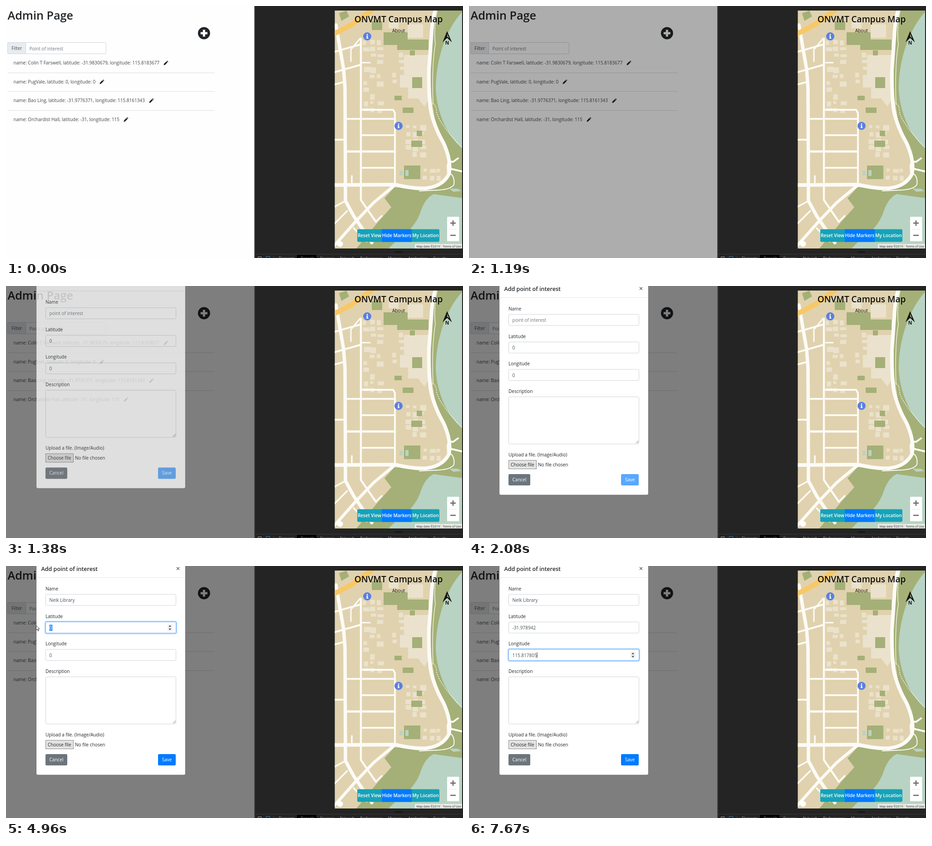
These frames come from a looping animation (1007x556 px, 8000 ms). An HTML page:

```html
<!DOCTYPE html>
<html lang="en">
<head>
<meta charset="utf-8">
<title>Admin page and campus map</title>
<style>
  html, body { margin: 0; width: 100%; height: 100%; overflow: hidden; background: #242424; }
  svg { display: block; width: 1007px; height: 556px; }
  text { font-family: "Open Sans", "Noto Sans", sans-serif; font-size: 10px; white-space: pre; }
  .semi { font-weight: 600; }
  .mid { text-anchor: middle; }
  .small { font-family: Roboto, Arial, sans-serif; font-size: 6.9px; }
  .tab { font-family: Roboto, Arial, sans-serif; font-size: 8.5px; }
  .road { fill: none; stroke: #fdfbf6; stroke-linejoin: round; stroke-linecap: round; }
</style>
</head>
<body>
<svg id="stage" viewBox="0 0 1007 556" xmlns="http://www.w3.org/2000/svg"></svg>
<script>
const LOOP = 8000;
const $ = id => document.getElementById(id);

// ---- drawing helpers ----
const rect = (x, y, w, h, fill, more = '') =>
  `<rect x="${x}" y="${y}" width="${w}" height="${h}" fill="${fill}" ${more}/>`;
const text = (x, y, s, fill = '#212529', more = '') =>
  `<text x="${x}" y="${y}" fill="${fill}" ${more}>${s}</text>`;
const path = (d, fill, more = '') => `<path d="${d}" fill="${fill}" ${more}/>`;
const line = (d, stroke, width = 1) => path(d, 'none', `stroke="${stroke}" stroke-width="${width}"`);
const road = (d, w) => `<path class="road" d="${d}" stroke-width="${w}"/>`;

// ---- left page ----
function pencil(x, y) {
  return `<g transform="translate(${x} ${y})">` +
    path('M-4.6 4.6L-4 1.6 1.4-3.8 3.8-1.4-1.6 4zM2-4.4L3-5.2Q3.6-5.4 5.1-3.9 5.5-3.2 5.1-2.8L4.4-2z', '#212529') + '</g>';
}

function page() {
  const rows = [
    ['Colin T Farswell', '-31.9830679', '115.8183677', 352],
    ['PugVale', '0', '0', 211],
    ['Bao Ling', '-31.9776371', '115.8161343', 320],
    ['Orchardist Hall', '-31', '115', 264]
  ];
  let s = rect(0, 0, 547, 556, '#fefefe') +
    text(3.5, 29.5, 'Admin Page', '#212529', 'class="semi" style="font-size:25.2px"') +
    '<circle cx="436.3" cy="60" r="13.4" fill="#212529"/>' +
    line('M428.8 60h15M436.300 52.500v15', '#fefefe', 5) +
    rect(3.5, 80.5, 217, 25, '#fff', 'rx="2.5" stroke="#ced4da"') +
    rect(3.5, 80.5, 40, 25, '#e9ecef', 'rx="2.5" stroke="#ced4da"') +
    text(12, 97, 'Filter', '#495057') +
    text(51.5, 97.5, 'Point of interest', '#6c757d');
  rows.forEach(([name, lat, lon, x], i) => {
    const y = 129 + i * 41.6;
    s += text(16.5, y, `name: ${name}, latitude: ${lat}, longitude: ${lon}`, '#40454a') + pencil(x, y - 3);
    if (i < 3) s += rect(4, Math.round(y + 17.5), 455, 1, '#dcdcdc');
  });
  return s;
}

// ---- map ----
const GREEN = '#a4b077', WATER = '#b8d3c3', BUILT = '#ebe2cd';

function seeded(seed) {
  return () => (seed = (seed * 16807) % 2147483647) / 2147483647;
}

// loosely gridded houses filling an area
function houses(x, y, w, h, seed) {
  const rnd = seeded(seed), cell = 15;
  let d = '';
  for (let r = 0; r + cell <= h; r += cell) {
    for (let c = 0; c + cell <= w; c += cell) {
      const bw = 7 + rnd() * 8, bh = 6 + rnd() * 7;
      if (rnd() < .75) d += `M${(x + c + rnd() * 3).toFixed(1)} ${(y + r + rnd() * 3).toFixed(1)}h${bw.toFixed(1)}v${bh.toFixed(1)}h${(-bw).toFixed(1)}z`;
    }
  }
  return path(d, BUILT);
}

function marker(x, y) {
  return `<g transform="translate(${x} ${y})"><circle r="9" fill="#5a7fe2"/>` +
    '<circle cy="-3.9" r="1.5" fill="#fff"/>' +
    path('M-2-1.500h3.300v4.700h1v1.500h-4.500v-1.500h1v-3.200h-.8z', '#fff') + '</g>';
}

function land() {
  return rect(724, 10, 282, 526, '#e0d2ae') +
    path('M940 10H1006V535H772L822 474 849 444 834 424 856 400 940 402 974 376 980 345 945 250 934 180z', GREEN) +
    path('M1006 12C970 50 946 120 947 185C950 240 975 290 1006 314z', WATER) +
    path('M1006 424L942 415Q922 425 912 458Q900 490 868 510L842 536H1006z', WATER) +
    path('M977 403l18 0 9 5-18 2z', WATER) +
    houses(786, 74, 46, 174, 11) + houses(850, 102, 32, 80, 5) +
    houses(880, 262, 50, 82, 23) + houses(918, 358, 46, 32, 8) +
    path('M877 108h53v100l-8 14-14-18h-22v-24h-18v-28h9z', BUILT) +
    path('M885 40h34v30h-34zM843 30h22v19h-22z', BUILT) +
    path('M734 16l16-6 6 13-17 10zM806 33h23v20h-23z', GREEN) +
    path('M832 58h53v16h46v23h-69v-11h-30zM895 157h22v24h-22zM890 98h11v11h-11z', GREEN) +
    path('M856 198h16v10h-16zM874 224h24v12h-24zM905 275h12v12h-12zM893 297h24v14h-24zM877 352h36v30h-36z', GREEN) +
    path('M867 364h7v10h-7zM880 362h7v13h-7z', WATER);
}

function streets() {
  let s = '';
  for (let i = 0; i < 4; i++) s += road(`M${i % 2 ? 782 : 747} ${249 + i * 36}H857`, i === 2 ? 5 : 4);
  return s + road('M724 101L780 85M724 146L780 130M724 173L747 167M724 295H746M782 229H853L857 236V392', 4) +
    road('M782 72V428L815 476', 4.5) +
    road('M782 125H802M760 122V96L780 72', 3) +
    road('M762 395V375M748 430L724 443M724 480L752 452M766 490L795 520M815 476L828 463', 3.5) +
    road('M727 42L744 140 747 180 748 430 766 463 806 522', 7.5) +
    road('M724 395L857 394Q900 404 926 402Q962 398 976 371Q982 342 964 302Q941 262 935 225Q931 185 932 140L937 70Q938 40 945 10', 8) +
    road('M858 394L810 434 770 476 724 528', 6.5) +
    road('M975 368Q968 340 985 344L996 336M975 358L1005 365', 4) +
    road('M972 366Q990 372 987 394Q981 404 955 406L911 408', 2) +
    road('M950 10Q942 45 946 85Q938 130 941 216', 1.3) +
    '<path class="road" d="M941 216Q948 217 949 236Q957 262 1004 312" stroke-width="1.3" stroke-dasharray="3 2" style="stroke-linecap:butt"/>' +
    line('M718 64L762 41 812 5', '#f8c866', 11);
}

function controls() {
  let s = marker(796, 67) + marker(865, 264.5) +
    text(865, 36, 'ONVMT Campus Map', '#0b0b0b', 'class="semi mid" style="font-size:19px"') +
    text(865, 57.5, 'About', '#111', 'class="mid"') +
    path('M972 55.500L982.500 80 972 70.500 962 80z', '#111') +
    path('M972 61L976.500 71.500 972 67.500z', GREEN) +
    text(972, 84.5, 'N', '#111', 'class="mid" style="font-weight:700;font-size:10.5px"') +
    rect(774, 492.5, 181, 28, '#17a2b8', 'rx="3"') + rect(828, 492.5, 66, 28, '#007bff');
  [[801, 'Reset View'], [861, 'Hide Markers'], [924.5, 'My Location']].forEach(([x, label]) => {
    s += text(x, 510, label, '#fff', 'class="semi mid"');
  });
  return s + rect(972, 465, 26.5, 54, '#fff', 'rx="1.5"') + rect(976, 492, 18, 1, '#e6e6e6') +
    line('M979 479h12M985 473v12M979 506h12', '#666', 2.4) +
    '<circle cx="736" cy="525" r="6.5" fill="#fff"/>' +
    rect(901, 525, 104, 10, '#f3f2ee', 'opacity=".85"') +
    text(904.5, 532.7, 'Map data ©2019', '#444', 'class="small"') +
    rect(957.5, 526, 1, 8, '#c9c6bd') +
    text(962, 532.7, 'Terms of Use', '#444', 'class="small"');
}

function tools() {
  const tabs = ['Elements', 'Console', 'Sources', 'Network', 'Performance', 'Memory', 'Application', 'Security'];
  return rect(547, 0, 460, 556, '#242424') + rect(547, 0, 1.5, 556, '#555', 'id="edge"') +
    '<clipPath id="screen"><rect x="724.5" y="10" width="280.5" height="525"/></clipPath>' +
    '<g clip-path="url(#screen)">' + land() + streets() + controls() + '</g>' +
    line('M857 541.500h16M857 544h16', '#0c0c0c') +
    rect(549, 547, 458, 1, '#3b3b3b') + rect(641, 549, 43, 7, '#000') +
    line('M555.500 557v-3.500h7v3.500', '#a8a8a8') + line('M573.500 557v-4.500h8v4.500', '#2f7fb8') +
    rect(590, 552, 1, 4, '#444') +
    text(601, 560, tabs.join('      '), '#a8a8a8', 'class="tab"');
}

// ---- dialog ----
// visit: pointer comes, presses, drags to a point; then hides, text is pasted, focus leaves
const FIELDS = [
  { id: 'name', label: 'Name', y: 62, visit: [2580, 3200], drag: [66, 70], hide: 3200,
    paste: 3200, blur: 3760, before: 'point of interest', after: 'Nelk Library' },
  { id: 'lat', label: 'Latitude', y: 123, visit: [4330, 5100], drag: [39, 128], hide: 5100,
    paste: 5170, blur: 5720, before: '0', after: '-31.978942', number: true },
  { id: 'lon', label: 'Longitude', y: 183.5, visit: [6660, 7380], drag: [82, 178], hide: 7490,
    paste: 7630, blur: LOOP, before: '0', after: '115.817805', number: true }
];
const PRESS = .52;
FIELDS.forEach(f => { f.focus = f.visit[0] + PRESS * (f.visit[1] - f.visit[0]); });

function field({ id, label, y, number }) {
  const spin = number ? `<g id="${id}Spin">` + rect(356, y + 6, 11, 14, '#f0f0f0') +
    path(`M358.500 ${y + 11}l2.700-3.500 2.700 3.500zM358.500 ${y + 15}l2.700 3.500 2.700-3.500z`, '#444') + '</g>' : '';
  return text(87, y - 8.5, label) +
    rect(86, y - 1, 290, 27.5, 'none', `id="${id}Glow" rx="3.5" stroke="#007bff" stroke-opacity=".35" stroke-width="2"`) +
    rect(87.5, y + .5, 287, 24.5, '#fff', 'rx="2.5" stroke="#ced4da"') +
    rect(87.5, y + .5, 287, 24.5, 'none', `id="${id}Ring" rx="2.5" stroke="#80bdff"`) +
    rect(95.5, y + 6.5, 6.8, 13.5, '#3390ff', `id="${id}Sel"`) +
    text(95.5, y + 17, '', '#495057', `id="${id}Text"`) + spin;
}

const button = (x, w, fill, label) =>
  rect(x, 415, w, 25, fill, 'rx="2.7"') + text(x + w / 2, 431, label, '#fff', 'class="mid"');

function dialog() {
  return '<g id="dialog">' +
    rect(67, -30, 328, 490.8, '#fff', 'rx="3.2" stroke="#000" stroke-opacity=".2" stroke-width=".7"') +
    text(77.5, 10.5, 'Add point of interest', '#212529', 'class="semi" style="font-size:12.5px"') +
    line('M376 2.500l6 6M382 2.500l-6 6', '#6a6a6a', 1.5) +
    rect(67, 25, 328, 1, '#e3e6ea') +
    FIELDS.map(field).join('') +
    text(87, 235.5, 'Description') +
    rect(87.5, 244.5, 287, 104, '#fff', 'rx="2.5" stroke="#ced4da"') +
    line('M367.500 347l6-6M370.500 347l3-3', '#777', .9) +
    text(87, 375.5, 'Upload a file. (Image/Audio)') +
    rect(87.5, 384.5, 61, 19, '#e3e3e3', 'stroke="#8c8c8c"') +
    text(92, 398, 'Choose file') + text(152, 398, 'No file chosen') +
    button(87, 48, '#6c757d', 'Cancel') +
    '<g id="save">' + button(335, 39, '#007bff', 'Save') + '</g>' +
    rect(149.5, 190.5, 1, 12.5, '#222', 'id="caret"') + '</g>';
}

$('stage').innerHTML = page() + tools() + '<rect id="shade" width="547" height="556"/>' + dialog() +
  '<g id="pointer">' +
  path('M0 0V10.800L2.500 8.500 4.100 12.400 5.800 11.700 4.200 7.900H7.500z', '#fff', 'id="arrow" stroke="#222" stroke-width=".9"') +
  path('M-2-6H2M0-6V6M-2 6H2', 'none', 'id="beam" stroke="#222"') + '</g>';

// ---- timeline ----
const ramp = (t, from, len) => Math.min(1, Math.max(0, (t - from) / len));
const between = (t, a, b) => t >= a && t < b;
const smooth = u => u * u * (3 - 2 * u);
const mix = (a, b, u) => a.map((v, i) => v + (b[i] - v) * u);

function pointerAt(t) {
  if (between(t, 110, 940)) return mix([838, 190], [434, 58], smooth(ramp(t, 110, 760)));
  const f = FIELDS.find(f => between(t, f.visit[0], f.hide));
  if (!f) return null;
  const [from, to] = f.visit, press = [112, f.y + 13];
  return t < f.focus
    ? mix([440, f.y + 100], press, smooth(ramp(t, from, f.focus - from)))
    : mix(press, f.drag, ramp(t, f.focus, to - f.focus));
}

const set = (id, key, value) => $(id).setAttribute(key, value);
const show = (id, on) => set(id, 'visibility', on ? 'inherit' : 'hidden');

function drawField(f, t) {
  const { id, number } = f;
  const glow = Math.min(ramp(t, f.focus, 150), 1 - ramp(t, f.blur, 170));
  const pasted = t >= f.paste;
  const selected = number && between(t, f.focus + 80, f.paste);
  set(id + 'Glow', 'opacity', glow);
  set(id + 'Ring', 'opacity', glow);
  show(id + 'Sel', selected);
  $(id + 'Text').textContent = pasted ? f.after : f.before;
  set(id + 'Text', 'fill', selected ? '#fff' : pasted || number ? '#495057' : '#6c757d');
  if (number) show(id + 'Spin', between(t, f.focus, f.blur));
}

function draw(t) {
  const slide = -33 * Math.pow(1 - ramp(t, 1268, 310), 1.8);
  set('shade', 'opacity', ramp(t, 1094, 150) * .5);
  set('dialog', 'opacity', ramp(t, 1268, 150));
  set('dialog', 'transform', `translate(0 ${slide.toFixed(2)})`);
  FIELDS.forEach(f => drawField(f, t));
  set('save', 'opacity', t < FIELDS[0].paste ? .65 : 1);
  show('caret', t >= 7670);

  const active = between(t, 870, 2080) || FIELDS.some(f => between(t, f.focus, f.blur));
  set('edge', 'fill', active ? '#484848' : '#5e5e5e');

  const p = pointerAt(t);
  show('pointer', p);
  if (p) {
    const [x, y] = p;
    const inField = t > 1590 && between(x, 87, 375) && FIELDS.some(f => between(y, f.y, f.y + 25));
    set('pointer', 'transform', `translate(${x.toFixed(1)} ${y.toFixed(1)})`);
    show('arrow', !inField);
    show('beam', inField);
  }
}

const start = performance.now();
function tick() {
  draw((performance.now() - start) % LOOP);
  requestAnimationFrame(tick);
}
tick();
</script>
</body>
</html>
```
